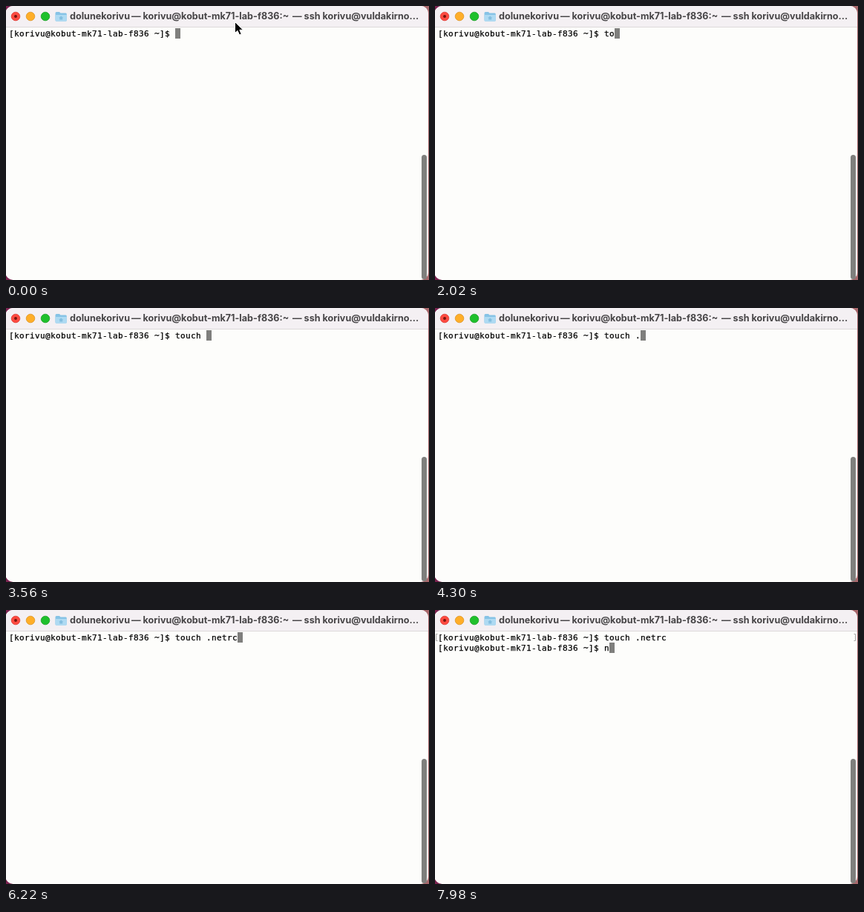
Animation of 570x370 px, one loop 8 s. Source, as an HTML page:

```html
<!DOCTYPE html>
<html lang="en">
<head>
<meta charset="utf-8">
<title>Terminal</title>
<style>
  html, body { margin: 0; width: 100%; height: 100%; overflow: hidden; background: #7b2350; }
  svg { display: block; }
  .title { font: 700 12.6px Inter, sans-serif; fill: #464446; }
  .term {
    font: 11px "DejaVu Sans Mono", monospace; letter-spacing: .378px; white-space: pre;
    fill: #000; stroke: #000; stroke-width: .25px;
  }
  .mark { fill: none; stroke: #a6a6a6; }
  .grey { fill: #7f7f7d; }
</style>
</head>
<body>
<svg width="570" height="370" viewBox="0 0 570 370">
  <defs>
    <linearGradient id="desk">
      <stop offset="0" stop-color="#7b2350"/>
      <stop offset="1" stop-color="#a8686c"/>
    </linearGradient>
    <clipPath id="win"><rect x="-.5" width="569.5" height="370" rx="10"/></clipPath>
    <path id="stem" d="M-3.5-7.5h1.5q2 0 2 2v11q0 2-2 2h-1.5M3.5-7.5h-1.5q-2 0-2 2M0 5.5q0 2 2 2h1.5M-2 3.5h4"/>
  </defs>
  <rect width="570" height="370" fill="url(#desk)"/>
  <g clip-path="url(#win)">
    <rect x="-1" width="571" height="370" fill="#fdfdfb"/>
    <rect x="-1" width="571" height="28" fill="#f4f0f3"/>
    <rect x="-1" y="28" width="571" height="1" fill="#dcd9da"/>
  </g>

  <g stroke-width=".8">
    <circle cx="13" cy="14" r="5.8" fill="#ff4a40" stroke="#dc3c34"/>
    <circle cx="33" cy="14" r="5.8" fill="#ffae28" stroke="#dc962a"/>
    <circle cx="53" cy="14" r="5.8" fill="#1fc02c" stroke="#1ca028"/>
    <circle cx="13" cy="14" r="2" fill="#74140e"/>
  </g>

  <path d="M66.5 9.5q0-1.5 1.5-1.5h4l1.5 1.5h7q1.3 0 1.3 1.5v8q0 1.5-1.5 1.5H68q-1.5 0-1.5-1.5z" fill="#86c3e6"/>
  <path d="M66.5 12h15.3v7q0 1.5-1.5 1.5H68q-1.5 0-1.5-1.5z" fill="#aedaf2"/>
  <path d="M74.2 13.4l-3 2.6h1v2.4h4V16h1z" fill="#84bfe0"/>

  <g class="title">
    <text x="86" y="18">dolunekorivu</text>
    <text x="169" y="18">— korivu@kobut-mk71-lab-f836:~</text>
    <text x="386" y="18">— ssh korivu@vuldakirno...</text>
  </g>

  <rect class="grey" x="560" y="201" width="7" height="168" rx="3.5"/>

  <g id="marks" class="mark">
    <path d="M3.5 32.5h-2v9h2"/>
    <path d="M564.5 32.5h2v9h-2"/>
  </g>
  <rect id="caret" class="grey" width="7" height="14"/>
  <g class="term">
    <text id="row0" x="4" y="41" xml:space="preserve"></text>
    <text id="row1" x="4" y="55" xml:space="preserve"></text>
  </g>

  <path id="arrow" d="M0 0V15L3.5 11.8 6 17.5 8.7 16.4 6.3 10.8H11Z" fill="#000" stroke="#fff"/>
  <g id="beam" fill="none">
    <use href="#stem" stroke="#fff" stroke-width="2.6"/>
    <use href="#stem" stroke="#000" stroke-width="1.1"/>
  </g>
</svg>
<script>
const LOOP = 8000, CELL = 7, ROW = 14;
const PROMPT = "[korivu@kobut-mk71-lab-f836 ~]$ ";

// bursts of typing: start in ms, gap between keys, keys
const BURSTS = [
  [1500, 280, "touch"],
  [3250, 650, " ."],
  [4500, 320, "netrc"],
  [6720, 0, "\n"],
  [7700, 0, "n"]
];
const KEYS = BURSTS.flatMap(([start, gap, keys]) =>
  [...keys].map((key, i) => ({ time: start + i * gap, key })));

const $ = id => document.getElementById(id);
const show = (id, on) => $(id).setAttribute("visibility", on ? "visible" : "hidden");
const move = (id, x, y) => $(id).setAttribute("transform", `translate(${x} ${y})`);

function drawText(t) {
  const typed = KEYS.filter(k => k.time <= t).map(k => k.key).join("");
  const rows = typed.split("\n").map(s => PROMPT + s);
  const last = rows.length - 1;
  $("row0").textContent = rows[0];
  $("row1").textContent = rows[1] || "";
  move("caret", 4 + rows[last].length * CELL, 30 + last * ROW);
  show("marks", last > 0);
}

// The pointer drifts down into the text area and hides once typing starts.
function drawPointer(t) {
  const p = Math.min(1, Math.max(0, (t - 20) / 300));
  const ease = 1 - (1 - p) ** 2;
  const x = Math.round(308 - 15 * ease);
  const y = Math.round(21 + 15 * ease);
  const visible = t < KEYS[0].time, inText = y > 28;
  move("arrow", x + .5, y + .5);
  move("beam", x + .5, y + .5);
  show("arrow", visible && !inText);
  show("beam", visible && inText);
}

function frame(now) {
  const t = now % LOOP;
  drawText(t);
  drawPointer(t);
  requestAnimationFrame(frame);
}
frame(0);
</script>
</body>
</html>
```
